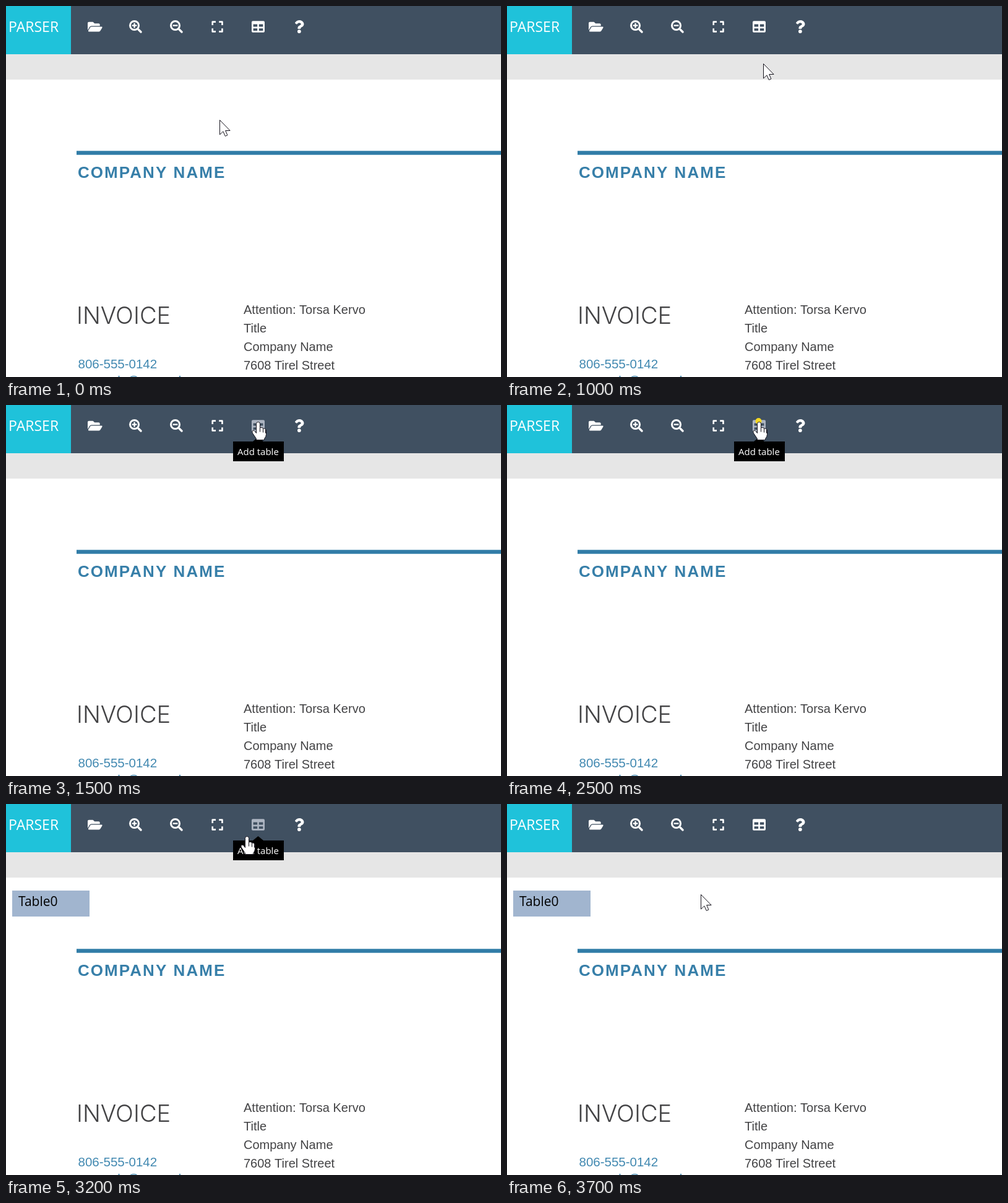
Write an HTML page with a canvas that moves like this. It is 800 by 600 pixels and loops after 4.4 s.

```html
<!DOCTYPE html>
<html lang="en">
<head>
<meta charset="utf-8">
<title>Add table</title>
<style>
html, body { margin: 0; width: 100%; height: 100%; overflow: hidden; background: #fff; }
canvas { display: block; width: 800px; height: 600px; }
</style>
</head>
<body>
<canvas id="stage" width="800" height="600"></canvas>
<script>
const ctx = document.getElementById('stage').getContext('2d');
const LOOP = 4400;
const SANS = '"Liberation Sans", Arial, sans-serif';
const UI = '"Open Sans", "Noto Sans", sans-serif';
const BLUE = '#377fa9';
const INK = '#434345';

// Pointer stops: time, x, y
const stops = [
  [0, 345, 184], [700, 352, 177], [800, 369, 156], [900, 393, 123],
  [1000, 414, 93], [1100, 411, 54], [1200, 407, 27],
  [3200, 389, 52], [3300, 360, 78], [3400, 338, 108],
  [3500, 322, 133], [3600, 315, 143], [3700, 313, 146]
];

const arrow = new Path2D('M0 0V23.5L5.4 18.4L8.8 26L12.4 24.4L9.2 17H16.6Z');
const hand = new Path2D('M-3 18V3Q-3 0 0 0Q3 0 3 3V9Q7 7.8 8 10.6Q11 9.5 12 12Q13 11.8 13 15V20Q13 24 10 27V29H-3V27L-9 18Q-10.5 15.2 -8.6 13.8Q-6.4 12.7 -3 18Z');
const knuckles = new Path2D('M3 9V16M8 10.6V17M12 12V18');
const folder = new Path2D('M573 292L500 416Q482 448 445 448H45Q15 448 24 412L97 288Q115 256 152 256H552Q583 256 573 292ZM152 224H480V176Q480 128 432 128H272L208 64H48Q0 64 0 112V390L69 272Q97 224 152 224Z');
const question = new Path2D('M202 0C122 0 70 33 30 91Q19 109 35 124L78 157Q97 168 111 152C137 121 155 103 194 103C225 103 263 123 263 153C263 175 244 187 214 204C179 224 132 248 132 310V320Q132 344 156 344H228Q252 344 252 320V314C252 271 378 270 378 154C378 66 287 0 202 0Z');

function text(str, x, y, font, color, spacing = '0px') {
  ctx.font = font;
  ctx.fillStyle = color;
  ctx.letterSpacing = spacing;
  ctx.fillText(str, x, y);
}

function box(x, y, w, h, color) {
  ctx.fillStyle = color;
  ctx.fillRect(x, y, w, h);
}

// Icons are drawn on a 512-unit grid
function icon(x, color, draw) {
  ctx.save();
  ctx.translate(x, 23);
  ctx.scale(21 / 512, 21 / 512);
  ctx.fillStyle = ctx.strokeStyle = color;
  draw();
  ctx.restore();
}

function line(width, ...pts) {
  ctx.lineWidth = width;
  ctx.beginPath();
  for (let i = 0; i < pts.length; i += 2) ctx.lineTo(pts[i], pts[i + 1]);
  ctx.stroke();
}

function disc(x, y, r) {
  ctx.beginPath();
  ctx.arc(x, y, r, 0, Math.PI * 2);
}

function lens(plus) {
  disc(208, 208, 172);
  ctx.lineWidth = 72;
  ctx.stroke();
  line(56, 112, 208, 304, 208);
  if (plus) line(56, 208, 112, 208, 304);
  ctx.lineCap = 'round';
  line(82, 365, 365, 464, 464);
}

function expand() {
  ctx.lineJoin = 'round';
  for (const sx of [1, -1]) for (const sy of [1, -1]) {
    const at = (x, y) => [224 + sx * x, 256 + sy * y];
    line(64, ...at(192, 64), ...at(192, 192), ...at(64, 192));
  }
}

function grid() {
  ctx.beginPath();
  ctx.roundRect(0, 32, 512, 448, 48);
  for (const x of [64, 288]) for (const y of [160, 320]) ctx.rect(x, y, 160, 96);
  ctx.fill('evenodd');
}

function help() {
  ctx.fill(question);
  disc(192, 443, 69);
  ctx.fill();
}

function toolbar(hover) {
  box(0, 0, 800, 78, '#405061');
  box(0, 0, 105, 78, '#1fc2da');
  box(0, 78, 800, 41, '#e6e6e6');
  text('PARSER', 4, 42, '23px ' + UI, '#fff');
  icon(132, '#fff', () => ctx.fill(folder));
  icon(199, '#fff', () => lens(true));
  icon(265, '#fff', () => lens(false));
  icon(332.4, '#fff', expand);
  icon(397, hover ? '#adb5c2' : '#fff', grid);
  icon(466, '#fff', help);
}

function page() {
  box(0, 119, 800, 481, '#fff');
  box(114, 234, 686, 7, '#6ba3c1');
  box(114, 235, 686, 5, '#317ca7');
  text('COMPANY NAME', 116, 278, 'bold 26px ' + SANS, BLUE, '2.05px');
  text('INVOICE', 114, 514, '300 38px Inter, ' + SANS, INK);
  const lines = ['Attention: Torsa Kervo', 'Title', 'Company Name', '7608 Tirel Street'];
  lines.forEach((s, i) => text(s, 384, 498 + i * 30, '20px ' + SANS, INK));
  text('806-555-0142', 116.5, 586, '20.5px ' + SANS, '#4289b1');
  text('go_reply@monople.com', 116.5, 613, '20.5px ' + SANS, '#4289b1');
}

function tooltip(alpha) {
  ctx.globalAlpha = alpha;
  box(367, 59, 82, 32, '#000');
  ctx.fill(new Path2D('M399 59L407.5 52L416 59Z'));
  text('Add table', 374, 81, '500 15px ' + UI, '#fff');
  ctx.globalAlpha = 1;
}

function pointer(x, y, hover) {
  ctx.save();
  ctx.translate(x + 0.5, y + 0.5);
  ctx.fillStyle = '#fff';
  ctx.strokeStyle = '#15131c';
  ctx.lineWidth = 1;
  const shape = hover ? hand : arrow;
  ctx.fill(shape);
  ctx.stroke(shape);
  if (hover) ctx.stroke(knuckles);
  ctx.restore();
}

function draw(t) {
  const [, x, y] = stops.findLast(s => s[0] <= t);
  const hover = t >= 1100 && t < 3300;
  toolbar(hover);
  page();
  if (t >= 2700) {
    box(10, 140, 125, 42, '#a1b5cf');
    text('Table0', 20, 165, '21px ' + UI, '#000');
  }
  if (t >= 1300 && t < 3300) tooltip(Math.min(1, (Math.floor(t / 100) - 12) / 3));
  if (t >= 2500 && t < 2600) {
    ctx.fillStyle = '#f5d923';
    disc(406.5, 26, 5);
    ctx.fill();
  }
  pointer(x, y, hover);
}

function tick() {
  draw(performance.now() % LOOP);
  requestAnimationFrame(tick);
}
tick();
</script>
</body>
</html>
```
